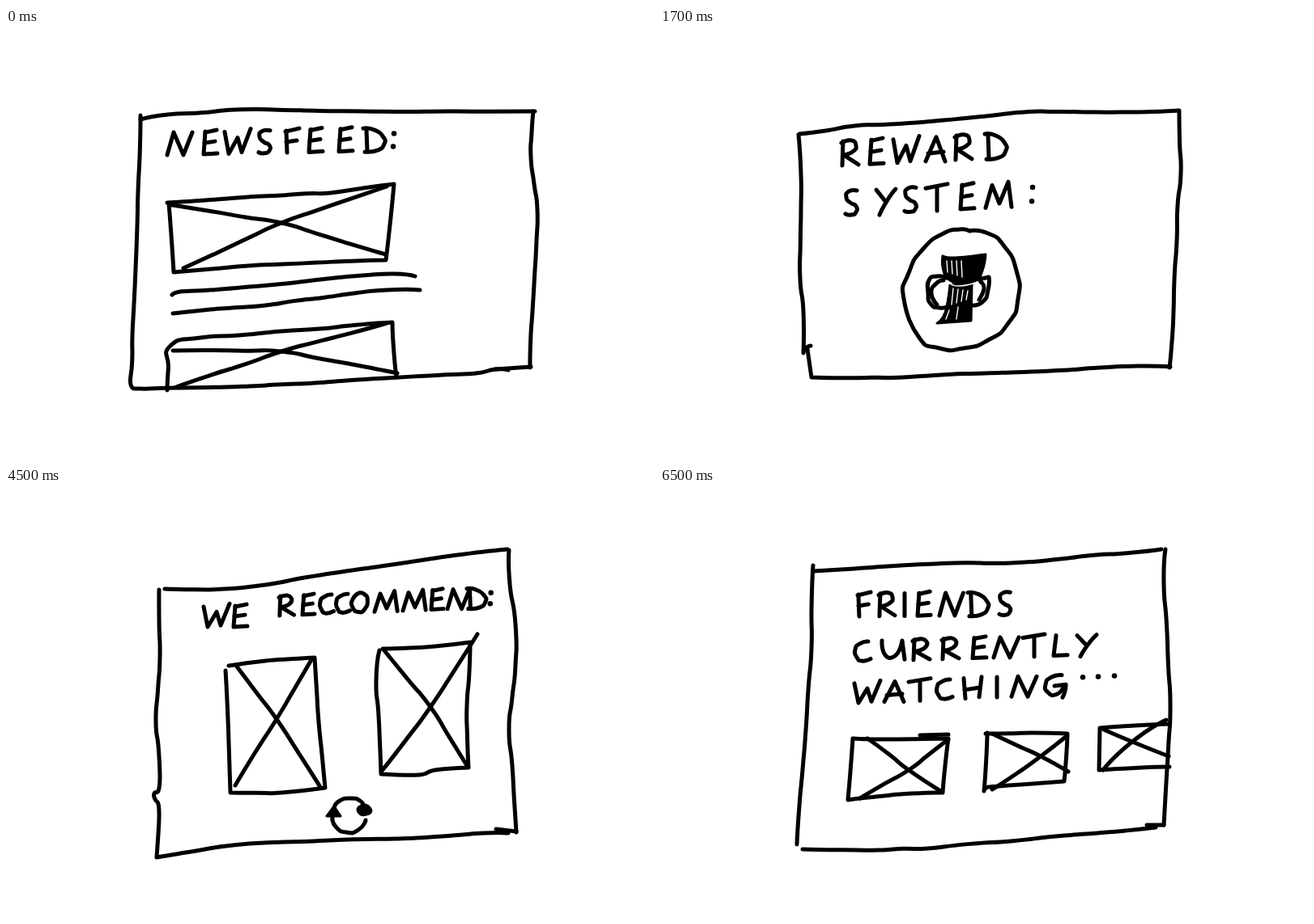
These frames come from a looping animation (800 px wide and 533 px high, 8000 ms). An HTML page:

```html
<!DOCTYPE html>
<html lang="en">
<head>
<meta charset="utf-8">
<title>Wireframe sketches</title>
<style>
  html, body { margin: 0; width: 100%; height: 100%; overflow: hidden; background: #fff; }
  svg { display: block; width: 100%; height: 100%; }
  g { fill: none; stroke: #000; stroke-width: 5; stroke-linecap: round; stroke-linejoin: round; }
  .dot { stroke-width: 6.5; }
  .solid { fill: #000; stroke-width: 3; }
  .gap { stroke: #fff; stroke-width: 1.4; }
</style>
</head>
<body>
<svg id="stage" viewBox="0 0 800 533"></svg>
<script>
const LOOP = 8000;
const NS = 'http://www.w3.org/2000/svg';
const stage = document.getElementById('stage');
const scenes = [];
let group;

// Hand lettering, drawn in a box 28 units high.
const angular = {
  N: '0,28 8,0 20,28 31,0',
  E: '2,0 0,28 17,27 / 2,1 16,-2 / 1,14 14,12',
  W: '0,1 5,28 16,8 21,26 32,-3',
  F: '1,1 2,28 / 0,2 17,-2 / 1,15 14,13',
  A: '0,28 13,0 24,28 / 3,19 22,17',
  Y: '0,1 11,14 / 24,0 13,14 4,30',
  T: '0,2 27,-3 / 14,1 14,28',
  M: '0,28 8,2 17,23 28,-2 32,27',
  H: '0,0 2,28 / 22,-2 19,26 / 1,16 18,13',
  I: '0,0 0,28',
  L: '3,0 0,28 17,27'
};
const round = {
  S: '14,0 4,1 1,8 6,14 13,18 13,25 7,28 0,27',
  D: '4,2 5,28 / 0,0 14,2 25,11 26,19 18,27 2,29',
  R: '2,0 1,28 / 0,2 12,-1 18,5 14,12 3,16 21,27',
  O: '9,0 1,9 1,20 9,27 18,23 22,10 17,1 9,0',
  C: '17,0 7,3 1,11 3,22 9,27 20,24',
  U: '0,0 2,16 9,24 19,18 25,0 28,26',
  G: '20,0 7,3 0,13 3,24 13,27 22,17 / 11,15 25,13 24,22 21,31',
  ':': '3,7 / 2,23',
  '.': '0,5'
};
const letters = { ...angular, ...round };

let seed = 7;
function wobble() {
  seed = (seed * 16807) % 2147483647;
  return (seed / 2147483647 - 0.5) * 1.8;
}

const points = text => text.trim().split(/\s+/).map(p => p.split(',').map(Number));

// Long stretches get extra, slightly unsteady points.
function unsteady(pts) {
  const out = [pts[0]];
  for (let i = 1; i < pts.length; i++) {
    const [ax, ay] = pts[i - 1], [bx, by] = pts[i];
    const n = Math.ceil(Math.hypot(bx - ax, by - ay) / 55);
    for (let k = 1; k < n; k++) {
      out.push([ax + (bx - ax) * k / n + wobble(), ay + (by - ay) * k / n + wobble()]);
    }
    out.push(pts[i]);
  }
  return out;
}

// Tangent at point i; ends and sharp turns get none, so corners stay crisp.
function tangent(pts, i) {
  if (!i || i === pts.length - 1) return [0, 0];
  const [a, b, c] = pts.slice(i - 1, i + 2);
  const ux = b[0] - a[0], uy = b[1] - a[1];
  const vx = c[0] - b[0], vy = c[1] - b[1];
  const u = Math.hypot(ux, uy), v = Math.hypot(vx, vy);
  if ((ux * vx + uy * vy) / (u * v) < 0.3) return [0, 0];
  const reach = Math.min(u, v) / (u + v) / 1.5;
  return [(ux + vx) * reach, (uy + vy) * reach];
}

function curve(pts) {
  let d = `M${pts[0]}`;
  for (let i = 1; i < pts.length; i++) {
    const [ax, ay] = pts[i - 1], [bx, by] = pts[i];
    const [sx, sy] = tangent(pts, i - 1), [ex, ey] = tangent(pts, i);
    d += `C${ax + sx},${ay + sy} ${bx - ex},${by - ey} ${bx},${by}`;
  }
  return d;
}

function add(parent, tag, attrs = {}) {
  const el = document.createElementNS(NS, tag);
  for (const name in attrs) el.setAttribute(name, attrs[name]);
  return parent.appendChild(el);
}

function stroke(pts, kind = '') {
  if (pts.length > 1) add(group, 'path', { d: curve(pts), class: kind });
  else add(group, 'path', { d: `M${pts[0]}h.01`, class: 'dot' });
}

const pen = (text, kind) => stroke(unsteady(points(text)), kind);

// One left edge per letter; the top line climbs by slope.
function write(text, lefts, top, slope, height, wide = 1) {
  const scale = height / 28;
  [...text].forEach((char, i) => {
    const y0 = top + (lefts[i] - lefts[0]) * slope;
    for (const part of letters[char].split('/')) {
      stroke(points(part).map(([x, y]) => [lefts[i] + x * wide, y0 + y * scale]));
    }
  });
}

// Outline plus two diagonals: ends a-b and c-d, both through the middle.
function picture(outline, ends, middle) {
  pen(outline);
  const [a, b, c, d] = ends.split(' ');
  pen(`${a} ${middle} ${b}`);
  pen(`${c} ${middle} ${d}`);
}

function scene(start, draw) {
  group = add(stage, 'g');
  draw();
  scenes.push({ start, group });
}

function newsfeed() {
  pen('166,113 200,107 284,101 440,103 653,103');
  pen('166,108 162,245 156,380 154,441 166,446 300,443 420,436 580,427 604,422 620,423');
  pen('604,422 648,419');
  pen('651,103 648,160 656,225 650,350 647,420');
  write('NEWSFEED:', [199, 244, 270, 312, 345, 374, 411, 441, 476], 129, -0.02, 28);
  picture('199,216 340,207 400,204 479,193 469,287 300,294 207,302 201,217',
    '205,219 469,280 219,297 470,196', '340,241');
  pen('205,330 215,326 300,320 440,306 480,304 505,307');
  pen('206,353 320,343 430,328 470,324 511,324');
  picture('199,448 203,393 240,383 340,375 477,364 482,432',
    '206,399 483,427 210,444 470,365', '340,400');
}

function trophy() {
  pen('349,282 365,284 402,280 398,300 390,312 375,317 358,312 350,300 349,282', 'solid');
  pen('358,318 385,317 384,362 342,365 352,352 358,318', 'solid');
  pen('354,309 342,307 332,312 331,328 334,341 345,346 356,344');
  pen('350,312 341,316 335,328 342,342');
  pen('393,311 406,308 405,324 399,338 386,343');
  pen('396,314 400,322 394,336');
  for (let i = 0; i < 4; i++) {
    const x = 354 + i * 6;
    pen(`${x},288 ${x + 1},${302 + i * 2}`, 'gap');
    pen(`${x + 8},${322 + i} ${x + 6},${342 - i * 2}`, 'gap');
  }
  pen('358,316 370,319 389,315', 'gap');
  pen('353,360 357,349', 'gap');
  pen('368,345 366,360', 'gap');
}

function reward() {
  pen('172,131 240,121 350,114 450,104 580,104 640,102');
  pen('171,132 174,180 173,310 177,350 177,402 180,396 186,393');
  pen('182,397 187,432 300,432 400,427 590,418 630,419');
  pen('641,102 643,180 639,220 634,350 629,420');
  write('REWARD', [224, 259, 288, 328, 364, 401], 140, -0.05, 30);
  write('SYSTEM:', [229, 267, 302, 328, 371, 402, 457], 201, -0.05, 30);
  pen('382,251 370,249 350,254 325,273 307,303 301,335 320,383 345,396 375,396 405,386 430,365 442,335 440,300 425,270 405,254 382,251');
  trophy();
}

function show() {
  pen('196,107 300,107 340,104 400,94 500,85 607,76');
  pen('188,112 186,160 189,250 185,426');
  pen('187,429 183,455 260,456 420,444 610,430 619,431');
  pen('613,79 611,120 614,170 608,330 609,429');
  write('SHOW:', [239, 268, 297, 324, 363], 127, -0.03, 25);
  picture('243,188 260,189 320,193 350,190 442,178 434,293 350,305 236,316 233,250 238,189',
    '254,191 432,293 240,309 441,180', '334,246');
  write('COMMENTS:', [222, 250, 279, 317, 354, 380, 408, 435, 461], 340, -0.07, 24, 0.92);
  pen('221,396 310,388 350,388 380,391 450,386 514,379');
  pen('227,412 260,407 340,402 380,406 450,401 500,401');
  pen('230,435 250,427 330,425 370,429 410,427 450,420 498,416');
}

function recommend() {
  pen('196,126 270,126 320,121 420,104 510,91 619,77');
  pen('189,127 190,210 185,290 190,360 188,376 183,379 184,386 188,392 189,410 186,458 280,443 380,438 480,435 590,428 620,428');
  pen('605,423 630,426');
  pen('621,78 622,120 629,170 629,220 621,300 630,427');
  write('WE', [244, 281], 147, 0, 26);
  write('RECCOMMEND:', [337, 366, 387, 407, 427, 455, 490, 525, 545, 569, 596], 135, -0.04, 24, 0.88);
  picture('275,221 320,215 381,211 386,290 394,372 340,378 277,378 271,227',
    '285,222 388,371 283,369 378,212', '334,287');
  picture('465,200 530,197 573,192 569,270 571,347 530,350 510,356 463,355 457,240 461,202',
    '466,201 570,346 464,351 582,182', '524,272');
  pen('405,397 412,388 425,385 437,388 442,396');
  pen('403,409 407,420 420,427 435,424 444,412');
  pen('396,407 405,395 413,407 396,407', 'solid');
  pen('434,398 438,405 448,404 451,400 443,393 434,398', 'solid');
}

function friends() {
  pen('190,104 340,95 450,93 619,77');
  pen('189,97 187,200 176,350 169,442');
  pen('176,448 270,449 330,447 540,428 612,421');
  pen('601,418 622,418');
  pen('624,77 622,120 630,270 622,418');
  write('FRIENDS', [244, 270, 302, 318, 345, 380, 419], 132, -0.01, 28, 0.95);
  write('CURRENTLY', [240, 274, 312, 348, 386, 412, 448, 486, 515], 191, -0.03, 25);
  write('WATCHING...', [240, 277, 307, 341, 375, 416, 434, 476, 522, 541, 561], 242, -0.04, 25);
  pen('321,307 356,306');
  picture('239,311 270,312 356,311 349,378 310,379 232,387 238,311',
    '256,311 348,377 247,385 356,312', '307,350');
  picture('402,305 460,304 503,305 499,364 405,371 400,376 404,304',
    '410,305 504,352 410,374 502,308', '470,333');
  picture('629,293 543,298 542,350 629,346',
    '548,300 628,333 547,350 625,288', '583,315');
}

[[0, newsfeed], [500, reward], [2500, show], [4500, recommend], [6500, friends]]
  .forEach(([start, draw]) => scene(start, draw));

function render(time) {
  const t = time % LOOP;
  const current = scenes.filter(s => s.start <= t).pop();
  for (const s of scenes) s.group.style.display = s === current ? '' : 'none';
}

const begin = performance.now();
function tick() {
  render(performance.now() - begin);
  requestAnimationFrame(tick);
}
tick();
</script>
</body>
</html>
```
